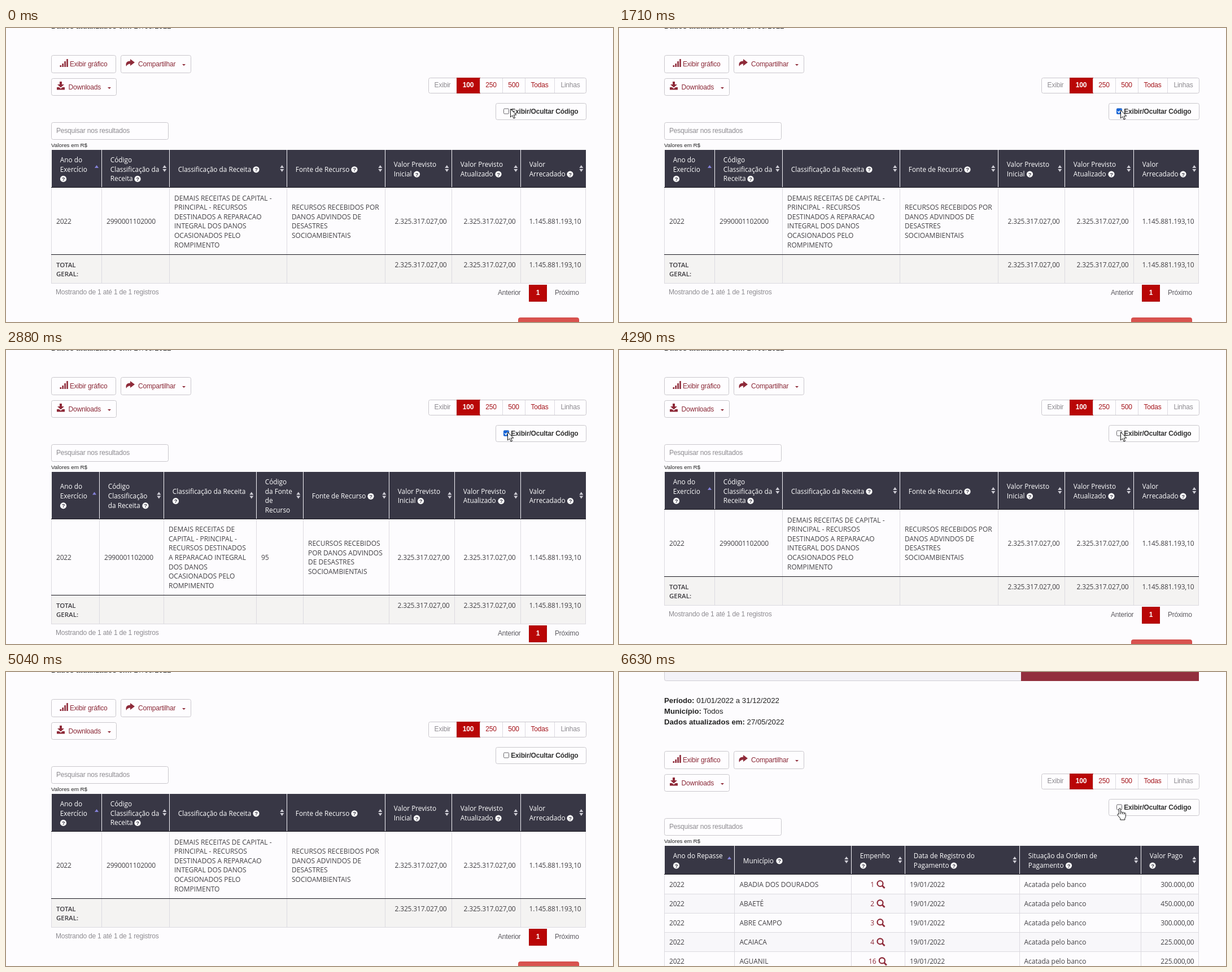
These frames come from a looping animation (1075x521 px, 8 s). An HTML page:

```html
<!DOCTYPE html>
<html lang="pt-BR">
<head>
<meta charset="utf-8">
<title>Consulta</title>
<style>
html, body { margin: 0; width: 100%; height: 100%; overflow: hidden; background: #fdfcfe; }
svg { display: block; width: 1075px; height: 521px; }
text { font: 12px "Liberation Sans", Arial, sans-serif; letter-spacing: -.2px; fill: #333; }
.info { font-size: 13.2px; letter-spacing: 0; fill: #222; }
.bold, .info tspan { font-weight: 700; }
.small { font-size: 9.8px; letter-spacing: 0; fill: #222; }
.wine { fill: #8b2a38; }
.red { fill: #a5161c; }
.gray { fill: #8e8c91; }
.page { fill: #5c5a60; }
.white { fill: #fff; }
.cell, .num, .head, .total { font-family: "Open Sans", "Noto Sans", sans-serif; letter-spacing: 0; fill: #434145; }
.cell { font-size: 12px; }
.num { font-size: 12px; letter-spacing: -.18px; }
.head { font-size: 11.8px; fill: #fff; }
.total { font-size: 11.5px; font-weight: 600; fill: #3d3b40; }
.help { font-size: 9.5px; font-weight: 700; fill: #383745; }
</style>
</head>
<body>
<svg id="stage" viewBox="0 0 1075 521"></svg>
<script>
const LOOP = 8000, LEFT = 80, RIGHT = 1027, LINE = 16.6;
const WINE = '#8e2a39', RED = '#b90606', DARK = '#383745', RULE = '#dcdae0', INK = '#17161d';

const rect = (x, y, w, h, fill, more = '') =>
  `<rect x="${x}" y="${y}" width="${w}" height="${h}" fill="${fill}" ${more}/>`;
const box = (x, y, w, h) => rect(x + .5, y + .5, w - 1, h - 1, '#fefdff', 'rx="3" stroke="#c9c7cc"');
const redBox = (x, y, w, h) => rect(x + .5, y + .5, w - 1, h - 1, RED, 'stroke="#a90a0a"');
const path = (d, fill, more = '') => `<path d="${d}" fill="${fill}" ${more}/>`;
const text = (x, y, str, cls = '', anchor = 'start') =>
  `<text x="${x}" y="${y}" class="${cls}" text-anchor="${anchor}">${str}</text>`;
const block = (x, mid, str, cls, anchor) => str.split('|').map((s, i, all) =>
  text(x, Math.round(mid + 4 + (i - (all.length - 1) / 2) * LINE), s, cls, anchor)).join('');
const caret = (x, y) => path(`M${x - 3} ${y}h6l-3 3z`, WINE);

function toolbar() {
  let s = rect(LEFT + .5, -110, 946, 33.5, '#f3f2f8', 'rx="3" stroke="#cfcdd3"')
    + rect(712, -110, 315, 34, '#922f3d')
    + text(80, -37, '<tspan>Período:</tspan> 01/01/2022 a 31/12/2022', 'info')
    + text(80, -18, '<tspan>Município:</tspan> Todos', 'info')
    + text(80, 1, '<tspan>Dados atualizados em:</tspan> 27/05/2022', 'info')
    + box(80, 48, 115, 32) + box(203, 48, 125, 32) + box(80, 89, 116, 31)
    + text(113, 68, 'Exibir gráfico', 'wine')
    + text(234, 68, 'Compartilhar', 'wine')
    + text(110.5, 109, 'Downloads', 'wine')
    + caret(315, 64) + caret(183, 105);
  [3, 6, 10, 14].forEach((h, i) => s += rect(95.5 + i * 3.9, 69 - h, 2.6, h, WINE));
  s += path('M220 55l8 6-8 6v-3.5q-5 0-7 4.5q-2.5-9 7-9.5z', WINE)
    + path('M95 95h4v5h4l-6 5.5-6-5.5h4zM90 105h4l3 2.5 3-2.5h4v4.500h-14z', WINE);

  s += box(748, 88, 280, 28);
  const edges = [748, 798, 839, 879, 919, 971, 1028];
  ['Exibir', '100', '250', '500', 'Todas', 'Linhas'].forEach((label, i) => {
    const on = i == 1, mid = (edges[i] + edges[i + 1]) / 2;
    if (i) s += rect(edges[i], 89, 1, 26, RULE);
    if (on) s += redBox(798, 88, 42, 28);
    s += text(mid, 105, label, on ? 'white bold' : i % 5 ? 'red' : 'gray', 'middle');
  });
  return s + box(867, 133, 161, 30)
    + text(894.3, 152, 'Exibir/Ocultar Código', 'bold')
    + rect(881.5, 143, 9, 9, '#fff', 'rx="1.5" stroke="#68666c"')
    + `<g id="tick">${rect(881, 142.5, 10, 10, '#1565d8', 'rx="1.5"')}
       ${path('M883 147.5l2.3 2.3 4-4.8', 'none', 'stroke="#fff" stroke-width="1.5"')}</g>`
    + box(80, 167, 208, 31)
    + text(89, 186, 'Pesquisar nos resultados', 'gray')
    + text(80, 211, 'Valores em R$', 'small');
}

// Each column: right edge, heading lines, centre of the help icon (0 for none).
function header(cols, top, bottom) {
  const mid = (top + bottom) / 2 + 1;
  let s = rect(LEFT + 1, top, RIGHT - LEFT - 1, bottom - top, DARK), left = LEFT;
  cols.forEach(([right, label, help], i) => {
    const x = right - 8.2, y = mid - 1.5, rows = label.split('|').length;
    s += block(left + 15.8, mid, label, 'head');
    if (help) {
      const hy = mid + (rows - 1) / 2 * LINE + .3;
      s += `<circle cx="${help}" cy="${hy}" r="5.6" fill="#fff"/>` + text(help, hy + 3.5, '?', 'help', 'middle');
    }
    s += i
      ? path(`M${x - 3.5} ${y - 1}h7l-3.5-5zM${x - 3.5} ${y + 1}h7l-3.5 5z`, '#cfced6')
      : path(`M${x - 3.8} ${y - 1}h7l-3.5-5z`, '#8481d8', 'class="sort"');
    if (right < RIGHT) s += rect(right, top, 1, bottom - top, '#f4f3f8');
    left = right;
  });
  return s;
}

const columnRules = (cols, top, bottom) => [LEFT, ...cols.map(c => c[0])]
  .map(x => rect(x == RIGHT ? x - 1 : x, top, 1, bottom - top, RULE)).join('');

function revenue(cols, cells, headEnd, bodyEnd) {
  const end = bodyEnd + 50, mid = (headEnd + bodyEnd) / 2 + .5;
  const values = ['2.325.317.027,00', '2.325.317.027,00', '1.145.881.193,10'];
  let s = header(cols, 216, headEnd)
    + rect(LEFT, bodyEnd, RIGHT - LEFT, 50, '#f4f3f2')
    + columnRules(cols, headEnd, end);
  cells.forEach((str, i) => {
    const x = (i ? cols[i - 1][0] : LEFT) + 9;
    s += block(x, mid, str, /^\d/.test(str) ? 'num' : 'cell');
  });
  values.forEach((v, i) => {
    const x = cols[cells.length + i][0] - 8.5;
    s += block(x, mid, v, 'num', 'end') + block(x, bodyEnd + 18, v, 'num', 'end');
  });
  return s + block(89, bodyEnd + 26, 'TOTAL|GERAL:', 'total')
    + [headEnd, bodyEnd].map(y => rect(LEFT, y - 1, RIGHT - LEFT, 1, INK)).join('')
    + rect(LEFT, end, RIGHT - LEFT, 1, RULE)
    + text(88, end + 20, 'Mostrando de 1 até 1 de 1 registros', 'gray')
    + text(871, end + 21, 'Anterior', 'page')
    + redBox(926, end + 3, 32, 30)
    + text(942, end + 21, '1', 'white bold', 'middle')
    + text(972, end + 21, 'Próximo', 'page')
    + rect(907.5, end + 61.5, 107, 30, '#d9534f', 'rx="3" stroke="#cf4a48"');
}

function transfers() {
  const cols = [[204, 'Ano do Repasse|', 101.5], [411, 'Município', 284], [506, 'Empenho|', 432.5],
    [709, 'Data de Registro do|Pagamento', 593], [924, 'Situação da Ordem de|Pagamento', 796.5],
    [RIGHT, 'Valor Pago|', 945]];
  const rows = [['ABADIA DOS DOURADOS', 1, 300], ['ABAETÉ', 2, 450], ['ABRE CAMPO', 3, 300],
    ['ACAIACA', 4, 225], ['AGUANIL', 16, 225]];
  let s = header(cols, 308, 359);
  rows.forEach(([town, id, value], i) => {
    const top = 359 + i * 34.1, mid = top + 18, shift = id > 9 ? 3.4 : 0;
    if (i % 2) s += rect(LEFT, top, RIGHT - LEFT, 34, '#f8f7fa');
    s += rect(LEFT, Math.round(top) - !i, RIGHT - LEFT, 1, i ? RULE : INK)
      + block(89, mid, '2022', 'num') + block(213.5, mid, town, 'cell')
      + `<g style="--ink:${WINE}">${block(452 + shift, mid, `<tspan fill="${WINE}">${id}</tspan>`, 'num', 'end')}</g>`
      + `<g transform="translate(${462.5 + shift} ${mid - 2})" fill="none" stroke="${WINE}" stroke-width="2.2">
         <circle r="5"/><path d="M3.5 3.5L8 8" stroke-width="2.8"/></g>`
      + block(515, mid, '19/01/2022', 'num') + block(717.5, mid, 'Acatada pelo banco', 'cell')
      + block(1018.5, mid, value + '.000,00', 'num', 'end');
  });
  return s + columnRules(cols, 359, 521);
}

const valueCols = (a, b, c, d, e, f) => [[a, 'Valor Previsto|Inicial', d],
  [b, 'Valor Previsto|Atualizado', e], [c, 'Valor|Arrecadado', f]];
const compact = revenue(
  [[169, 'Ano do|Exercício|', 101.5], [289, 'Código|Classificação da|Receita', 233],
    [497, 'Classificação da Receita', 443], [671, 'Fonte de Recurso', 617],
    ...valueCols(789, 911, RIGHT, 727.5, 872, 999)],
  ['2022', '2990001102000',
    'DEMAIS RECEITAS DE CAPITAL -|PRINCIPAL - RECURSOS|DESTINADOS A REPARACAO|INTEGRAL DOS DANOS|OCASIONADOS PELO|ROMPIMENTO',
    'RECURSOS RECEBIDOS POR|DANOS ADVINDOS DE|DESASTRES|SOCIOAMBIENTAIS'], 283, 402);
const expanded = revenue(
  [[165, 'Ano do|Exercício|', 101.5], [279, 'Código|Classificação|da Receita', 247],
    [443, 'Classificação da Receita|', 300.5], [526, 'Código|da Fonte|de|Recurso', 0],
    [678, 'Fonte de Recurso', 646], ...valueCols(794, 911, RIGHT, 734.5, 877, 999.5)],
  ['2022', '2990001102000',
    'DEMAIS RECEITAS DE|CAPITAL - PRINCIPAL -|RECURSOS DESTINADOS|A REPARACAO INTEGRAL|DOS DANOS|OCASIONADOS PELO|ROMPIMENTO',
    '95', 'RECURSOS RECEBIDOS|POR DANOS ADVINDOS|DE DESASTRES|SOCIOAMBIENTAIS'], 300, 435);

const stage = document.getElementById('stage');
const outline = 'stroke="#111" stroke-linejoin="round"';
stage.innerHTML = rect(0, 0, 1075, 521, '#fdfcfe')
  + `<g id="bar">${toolbar()}</g><g id="compact">${compact}</g>
  <g id="expanded">${expanded}</g><g id="transfers">${transfers()}</g>
  <g id="pointer"><g id="arrow">${path('M.5 .5V15l3.3-3.1 2.3 5.3 2.4-1-2.3-5.2h4.6z', '#fff', outline)}</g>
  <g id="hand">${path('M-1.5 1.5q1.5-2.5 3 0v6q2-1.5 3 .5 2-1.2 3 .8 2.5-1 2.8 1.5v4.5q0 2-1.5 3.5v2.7h-8v-2.5l-4.8-6q-1-2.5 2.5-1.5z', '#fff', outline)}
  ${path('M1.5 7.5v3.5M4.5 8v3M7.5 9v2.5', 'none', outline)}</g></g>`;

const el = id => document.getElementById(id);
const show = (id, on) => el(id).style.display = on ? '' : 'none';

// Pointer stops: time, x, y.
const stops = [[0, 893, 143], [130, 893, 143], [750, 877, 149], [960, 877, 149], [1000, 880, 148],
  [1210, 880, 148], [1380, 888, 145], [4290, 888, 145], [4560, 925, -25], [5290, 925, -25],
  [5291, 880, 530], [5700, 880, 530], [6080, 871, 252], [6130, 871, 252], [6290, 874, 244],
  [6500, 874, 244], [6630, 887, 241], [LOOP, 887, 241]];

function pointerAt(t) {
  const i = stops.findIndex(s => s[0] > t);
  const [t0, x0, y0] = stops[i - 1], [t1, x1, y1] = stops[i];
  const u = (t - t0) / (t1 - t0), k = u * u * (3 - 2 * u);
  return [x0 + (x1 - x0) * k, y0 + (y1 - y0) * k];
}

function draw(now) {
  const t = now % LOOP, wide = t >= 2250 && t < 4290, last = t >= 5290;
  show('compact', !wide && !last);
  show('expanded', wide);
  show('transfers', last);
  show('tick', t >= 1710 && t < 4000);
  show('hand', t >= 6560);
  show('arrow', t < 6560);
  el('bar').setAttribute('transform', `translate(0 ${last ? 92 : 0})`);
  el('expanded').querySelector('.sort').style.opacity = Math.min(1, .6 + (t - 2250) / 1000);
  el('pointer').setAttribute('transform', `translate(${pointerAt(t)})`);
  requestAnimationFrame(draw);
}
draw(performance.now());
</script>
</body>
</html>
```
